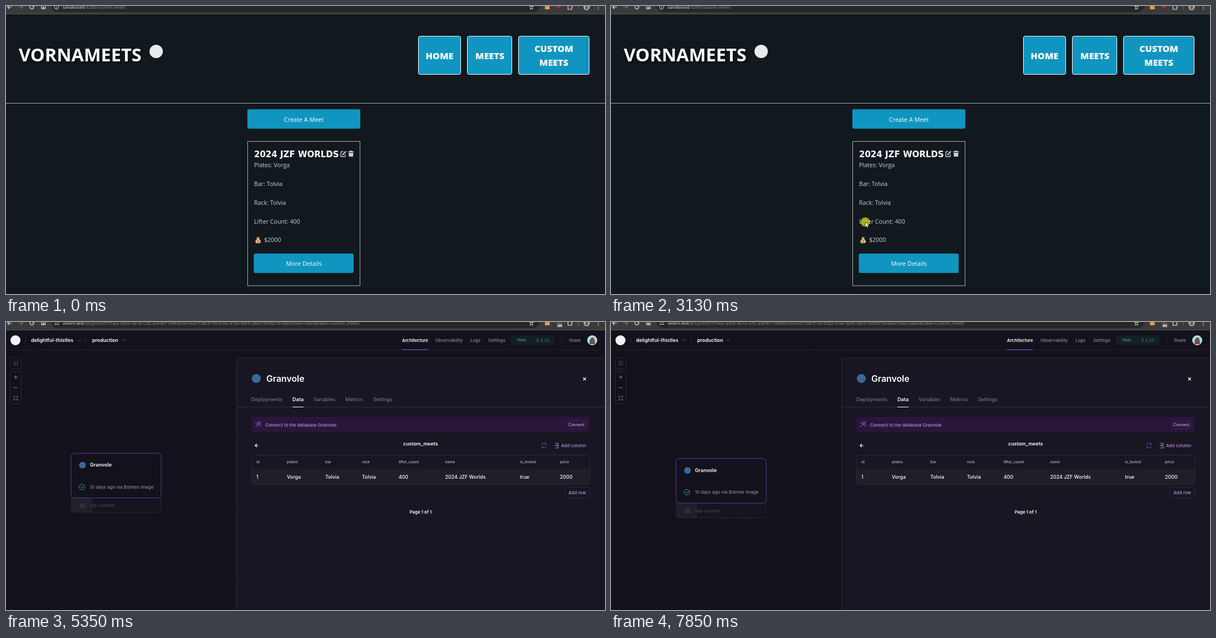
Recreate the animation shown at these times as an HTML page. Size 1077x520 px, loop 8000 ms.

```html
<!DOCTYPE html>
<html lang="en">
<head>
<meta charset="utf-8">
<title>Custom meets</title>
<style>
html, body { margin: 0; width: 100%; height: 100%; overflow: hidden; background: #11191f; }
svg { display: block; width: 100%; height: 100%; }
text { white-space: pre; }
.mid { text-anchor: middle; }
.line { fill: none; stroke-linecap: round; stroke-linejoin: round; }
#site, #bar { font-family: "Open Sans", "Noto Sans", sans-serif; }
#admin { font-family: Inter, Roboto, sans-serif; }
.brand { font-size: 32.5px; font-weight: 700; fill: #fff; filter: drop-shadow(2px 3px 2px #000a); }
.nav { font-size: 16.2px; font-weight: 800; fill: #fff; }
.title { font: 700 15px "DejaVu Sans", sans-serif; fill: #fff; }
.semi { font-weight: 600; fill: #fff; }
</style>
</head>
<body>
<svg viewBox="0 0 1077 520">
  <defs>
    <pattern id="dots" width="13" height="13" patternUnits="userSpaceOnUse">
      <circle cx="4" cy="4" r=".6" fill="#211e2e"/>
    </pattern>
  </defs>

  <g id="site">
    <rect width="1077" height="520" fill="#11191f"/>
    <text class="brand" x="23" y="100">VORNAMEETS</text>
    <circle cx="270" cy="82" r="12" fill="#e8eaec"/>
    <g fill="#1095c1" stroke="#fff">
      <rect x="741.5" y="54.5" width="76" height="69" rx="3"/>
      <rect x="829.5" y="54.5" width="80" height="69" rx="3"/>
      <rect x="921.5" y="54.5" width="127" height="69" rx="3"/>
    </g>
    <g class="nav mid">
      <text x="779.5" y="96">HOME</text>
      <text x="870" y="96">MEETS</text>
      <text x="985" y="83">CUSTOM</text>
      <text x="985" y="108">MEETS</text>
    </g>
    <path d="M0 175.5H1077" stroke="#a9aeb2"/>
    <rect x="434.5" y="244.5" width="202" height="260.5" fill="none" stroke="#a9b0b4"/>
    <g fill="#1095c1">
      <rect x="434" y="186.5" width="203" height="35" rx="3"/>
      <rect x="445.5" y="447" width="179.5" height="35" rx="3"/>
    </g>
    <g class="mid" font-size="10.9" fill="#fff">
      <text x="535.5" y="208.7">Create A Meet</text>
      <text x="535.5" y="469">More Details</text>
    </g>
    <text class="title" x="446" y="273">2024 JZF WORLDS</text>
    <g class="line" stroke="#c5ced4" stroke-width="1.4">
      <path d="M606 263H603Q602 263 602 264V271Q602 272 603 272H609Q610 272 610 271V268"/>
      <path d="M605.5 268.5L610.5 263" stroke-width="2.2"/>
      <path d="M615.5 263.3H625M618.5 262H622"/>
    </g>
    <path d="M616 265H624.5L624 272H616.5Z" fill="#c5ced4"/>
    <rect id="sel" height="17" fill="#113a4e"/>
    <g font-size="10.7" fill="#c8d2d9">
      <text x="446" y="291">Plates: Vorga</text>
      <text x="446" y="325">Bar: Tolvia</text>
      <text x="446" y="358.7">Rack: Tolvia</text>
      <text x="446" y="392.5">Lifter Count: 400</text>
      <text x="464" y="426.3">$2000</text>
    </g>
    <path d="M450.5 417.5H456L455 420Q459 424 458 427Q457 428.5 453.3 428.5T448.5 427Q447.5 424 451.5 420Z" fill="#e3b078"/>
    <text class="mid" x="453.3" y="427" font-size="6" fill="#6b4520">$</text>
  </g>

  <g id="admin">
    <rect width="1077" height="520" fill="#13111c"/>
    <rect y="51" width="414" height="469" fill="url(#dots)"/>
    <path d="M0 50.5H1077" stroke="#242033"/>
    <path d="M712 50H758.5" stroke="#6844b8" stroke-width="1.3"/>
    <circle cx="17" cy="33" r="9" fill="#f4f4f6"/>
    <g class="line" stroke="#34313f">
      <path d="M34 37L36 28M143 37L145 28M999 28V38"/>
      <path d="M129 32L131.5 34.5L134 32M208.5 32L211 34.5L213.5 32" stroke="#686473"/>
    </g>
    <g class="semi" font-size="8.9">
      <text x="45" y="36">delightful-thistles</text>
      <text x="155" y="36">production</text>
    </g>
    <g font-size="7.8" font-weight="500" fill="#8d8a98">
      <text class="semi" x="712" y="35.5">Architecture</text>
      <text x="772" y="36">Observability</text>
      <text x="835" y="36">Logs</text>
      <text x="867" y="36">Settings</text>
      <text x="1012" y="36">Share</text>
    </g>
    <rect x="908" y="24" width="78" height="18" rx="3" fill="#131f20"/>
    <text x="918" y="35" font-size="6.6" font-weight="500" fill="#45a37f">TRIAL</text>
    <text x="953" y="36" font-size="7.8" fill="#3a7864">$ 4.34</text>
    <circle cx="1054" cy="33" r="9" fill="#a9dde6"/>
    <path d="M1049 40Q1049 29 1054 28T1059 40Z" fill="#74513e"/>

    <g fill="#13111c" stroke="#2c2939">
      <rect x="7.5" y="64.5" width="20" height="20" rx="3"/>
      <rect x="7.5" y="89.5" width="20" height="58" rx="3"/>
    </g>
    <g class="line" stroke="#858190">
      <path d="M14.5 71.5H21M14.5 74.5H21M14.5 77.5H21" stroke-width="1.5" stroke-dasharray="0 3"/>
      <path d="M14.5 99.5H20.5M17.5 96.5V102.5M14.5 118.5H20.5"/>
      <path d="M14 136V134H16M19 134H21V136M21 139V141H19M16 141H14V139M14 134L16.5 136.5M21 134L18.5 136.5M21 141L18.5 138.5M14 141L16.5 138.5" stroke-width=".8"/>
    </g>

    <g id="card">
      <path d="M117.5 320V347.5Q117.5 353.5 123.5 353.5H273Q279 353.5 279 347.5V320" fill="#16141f" stroke="#2a2737"/>
      <path d="M118 320H155V353H123Q118 353 118 347Z" fill="#211f2a"/>
      <rect x="117" y="246.5" width="162" height="80.5" rx="6" fill="#13111c" stroke="#5b36a0"/>
      <circle cx="137.5" cy="268" r="6" fill="#39699a"/>
      <text class="semi" x="151" y="270.5" font-size="9">Granvole</text>
      <path class="line" d="M141 305A5 5 0 1 1 138.5 302.7M134.5 307L136.5 309L141 303.5" stroke="#4b9c81"/>
      <text x="151" y="310.3" font-size="8.05" fill="#9d9aa8">10 days ago via Bolmex Image</text>
      <path class="line" d="M134 340L135.5 337.5H140L141.5 340V344H134ZM134 340.5H141.5" stroke="#4b4857"/>
      <text x="151" y="343.5" font-size="8" fill="#4b4857">slip-volume</text>
    </g>

    <path d="M414.5 521V71Q414.5 65 420.5 65H1078V521Z" fill="#181622" stroke="#302d3c"/>
    <path d="M415 153.5H1077" stroke="#302d3c"/>
    <path d="M515 153.5H535" stroke="#fff"/>
    <circle cx="450" cy="102" r="8" fill="#39699a"/>
    <text class="semi" x="468" y="108" font-size="15.8">Granvole</text>
    <path class="line" d="M1038 100.5L1042.5 105M1042.5 100.5L1038 105" stroke="#fff" stroke-width="1.2"/>
    <g font-size="9" fill="#85818f">
      <text x="441" y="143">Deployments</text>
      <text class="semi" x="515" y="143">Data</text>
      <text x="553" y="143">Variables</text>
      <text x="610" y="143">Metrics</text>
      <text x="660" y="143">Settings</text>
    </g>

    <rect x="441" y="171" width="609" height="28.5" rx="4" fill="#291639"/>
    <path class="line" d="M448.5 189L458 179.5M451 182L455.5 186.5M453.5 180L458 184.5M449 181V183M457 186V188.5" stroke="#8b47cf" stroke-width="1.2"/>
    <text x="466" y="188.5" font-size="7.9" font-weight="500" fill="#b98be0">Connect to the database Granvole</text>
    <rect x="1008" y="178" width="35" height="15" rx="3" fill="#2c183f" stroke="#3a2152"/>
    <text class="mid" x="1025.5" y="188" font-size="7.2" font-weight="500" fill="#c6a3e8">Connect</text>

    <path class="line" d="M453.5 223H448M450.5 220.5L448 223L450.5 225.5" stroke="#fff" stroke-width="1.2"/>
    <text class="mid semi" x="745.5" y="223" font-size="8.8">custom_meets</text>
    <g class="line" stroke="#7d45b5">
      <path d="M963.5 222A4 4 0 0 1 971 220.5V218.5M971 220.5H969M971.5 224A4 4 0 0 1 964 225.5V227.5M964 225.5H966"/>
      <path d="M988 219H993V227.5H988M986.5 223H991M989.5 221.5L991 223L989.5 224.5" stroke="#b98be0"/>
    </g>
    <text x="998" y="226" font-size="7.9" font-weight="500" fill="#b98be0">Add column</text>

    <path d="M442 265.5H1050V289Q1050 293.5 1045 293.5H447Q442 293.5 442 289Z" fill="#201e29"/>
    <rect x="441.5" y="240.5" width="608.5" height="53" rx="5" fill="none" stroke="#2c2939"/>
    <g id="table"></g>
    <rect x="1004.5" y="298.5" width="45" height="19" rx="3" fill="none" stroke="#2c2939"/>
    <text class="mid" x="1027" y="311" font-size="7.9" font-weight="500" fill="#b394dc">Add row</text>
    <text class="mid semi" x="745.5" y="345.7" font-size="7.9">Page 1 of 1</text>
  </g>

  <g id="bar">
    <rect width="1077" height="14" fill="#3a3a3a"/>
    <path d="M0 14.5H1077" stroke="#555"/>
    <rect x="82" y="-12" width="877" height="23" rx="11" fill="#272727"/>
    <g class="line" stroke="#e2e2e2" stroke-width="1.2">
      <path d="M10 2H3M6 -1L3 2L6 5"/>
      <path d="M23 2H30M27 -1L30 2L27 5" stroke="#777"/>
      <path d="M50 2A3.5 3.5 0 1 1 48.5 -1M50 -2V1H47"/>
      <path d="M64 0V5H70.5V0M66.5 5V2H68V5"/>
      <path d="M941.5 0.5H948.5L946 3L947 6L945 4.5L942.5 6L943.5 3Z" stroke-width=".9"/>
      <path d="M1010.5 -1H1017V1.5Q1019.5 2 1017 4V6H1010.5Z"/>
      <path d="M1029 -1V6" stroke="#666"/>
      <path d="M1065 -1V6" stroke-width="1.8" stroke-dasharray="0 3.3"/>
    </g>
    <rect x="969" y="-2" width="8.5" height="8" fill="#e29a52"/>
    <circle cx="993.5" cy="1" r="3.5" fill="#a02f35"/>
    <circle cx="1044" cy="2" r="5.5" fill="#a9bcc2"/>
    <circle cx="1044" cy="3" r="3" fill="#7c5640"/>
    <g id="siteUrl" font-size="7.7" fill="#979797">
      <path class="line" d="M94.8 2A3.8 3.8 0 1 1 87.2 2A3.8 3.8 0 1 1 94.8 2M91 1.5V4M91 -.2V0" stroke="#d5d5d5"/>
      <text x="102" y="4.7"><tspan fill="#eee">sandboxed</tspan>:4206/custom-meets</text>
    </g>
    <g id="adminUrl" font-size="7.7" fill="#979797">
      <path class="line" d="M88 0H90M92 0H95M88 4H91M93 4H95" stroke="#d5d5d5" stroke-width="1.3"/>
      <rect x="990" y="2" width="11" height="8" rx="1.5" fill="#555"/>
      <text class="mid" x="995.7" y="8.5" font-size="6.5" font-weight="700" fill="#fff">44</text>
      <text x="102" y="4.7"><tspan fill="#eee">velorn.test</tspan>/project/b51f7ace-d306-4b18-ccf2-a3e9b7148fd6/service/728c5190-6332-47ae-fd45-c8b615e90274/data?state=table&amp;table=custom_meets</text>
    </g>
  </g>

  <circle id="press" r="8.5" fill="#d2cf12" fill-opacity=".75"/>
  <g id="cursor" stroke="#111" stroke-width=".7" fill="#fff" stroke-linejoin="round">
    <path id="arrow" d="M0 0V9.5L2.2 7.5L3.7 11L5.4 10.3L3.9 7H6.7Z"/>
    <path id="hand" d="M-1 0Q0 -1.5 1 0V4.5Q2 3.5 3 4.7Q4 4 4.6 5.2Q6 4.7 6.2 6V9Q6 11 5 12.5H0L-3.7 7.8Q-3.5 6 -1 7.8Z"/>
  </g>
</svg>
<script>
const LOOP = 8000, SWITCH = 5350;
const $ = id => document.getElementById(id);

// cursor tip: time, x, y
const path = [
  [370, 1042, 499], [560, 860, 420], [780, 590, 330], [960, 434, 298], [1120, 463, 287],
  [1190, 452, 285], [1250, 445, 285], [1450, 446, 287], [1660, 476, 286], [1750, 476, 287],
  [1950, 456, 318], [2120, 447, 332], [2240, 446, 322], [2430, 466, 324], [2500, 466, 325],
  [2700, 446, 357], [2880, 466, 357], [3060, 457, 390], [3130, 457, 390], [3370, 490, 390],
  [3600, 470.5, 421], [3820, 506, 421], [4000, 508, 420], [4070, 511, 417], [4200, 533, 385],
  [4320, 520, 300], [4480, 440, 180], [4600, 361, 100], [4740, 395, 37], [4890, 383, -18],
  [5400, 395, -18], [5800, 460, 200], [6140, 513, 281], [6280, 513, 281], [6620, 613, 281],
  [7040, 846, 281], [7300, 1032, 279], [7380, 1030, 270], [7800, 110, -14], [8000, 110, -20]
];
// press time, release time, row top, end of text
const drags = [
  [1450, 1720, 278, 513], [2240, 2480, 312, 497], [2700, 2900, 346, 504],
  [3130, 3400, 380, 528], [3600, 3820, 414, 495]
];

function tip(t) {
  const i = path.findIndex(k => k[0] > t);
  if (i < 1) return [0, -30];
  const [a, x, y] = path[i - 1], [b, u, v] = path[i], f = (t - a) / (b - a);
  return [x + (u - x) * f, y + (v - y) * f];
}

const show = (id, on) => $(id).style.display = on ? "" : "none";
const move = (id, x, y) => $(id).setAttribute("transform", `translate(${x} ${y})`);

const columns = [
  [450, "id", "1"], [505, "plates", "Vorga"], [574, "bar", "Tolvia"], [640, "rack", "Tolvia"],
  [706, "lifter_count", "400"], [789.5, "name", "2024 JZF Worlds"], [924, "is_tested", "true"],
  [996, "price", "2000"]
];
$("table").innerHTML = columns.map(([x, head, value]) =>
  `<text x="${x}" y="255" font-size="6.7" font-weight="600" fill="#a5a2af">${head}</text>
   <text x="${x}" y="282.5" font-size="8.9" font-weight="500" fill="#fff">${value}</text>`).join("");

function draw(t) {
  const admin = t >= SWITCH, [x, y] = tip(t);
  show("site", !admin);
  show("siteUrl", !admin);
  show("admin", admin);
  show("adminUrl", admin);

  const settle = Math.min(1, Math.max(0, (t - SWITCH) / 650));
  move("card", 0, -9.5 * (1 - settle) ** 3);

  const drag = drags.filter(d => d[0] <= t).pop();
  show("sel", drag);
  if (drag) {
    const [start, end, top, limit] = drag, left = tip(start)[0];
    const right = Math.min(limit, tip(Math.min(t, end))[0]);
    $("sel").setAttribute("x", left);
    $("sel").setAttribute("y", top);
    $("sel").setAttribute("width", Math.max(0, right - left));
  }
  show("press", drag && t < drag[1]);
  move("press", x, y);

  const onRow = admin && x > 441 && y > 265 && y < 293;
  show("arrow", !onRow);
  show("hand", onRow);
  move("cursor", x, y);
}

function tick(now) {
  draw(now % LOOP);
  requestAnimationFrame(tick);
}
draw(0);
requestAnimationFrame(tick);
</script>
</body>
</html>
```
